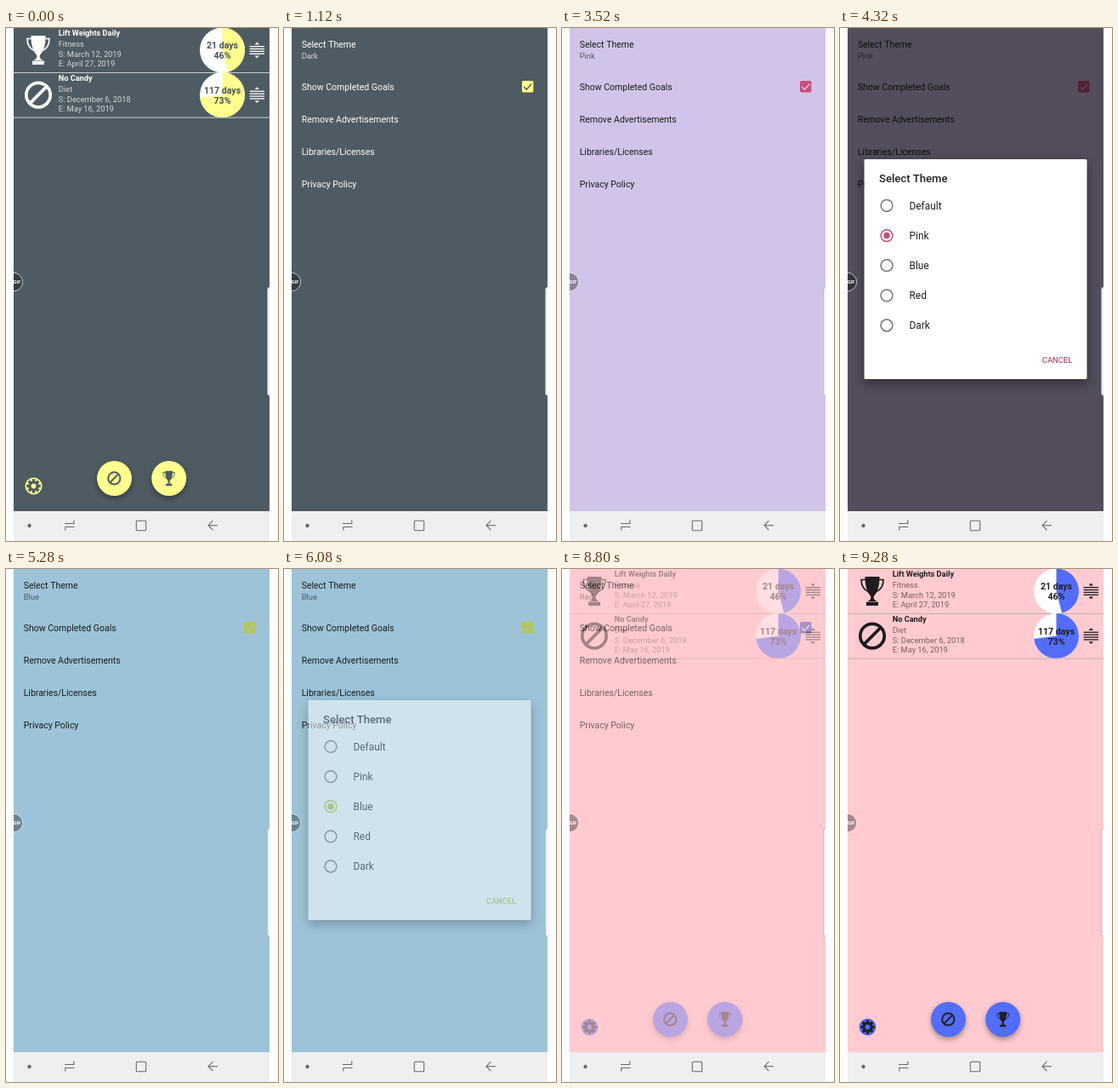
Recreate the animation shown at these times as an HTML page with a canvas. Size 320 by 602 pixels, loop 9.6 s.

```html
<!DOCTYPE html>
<html lang="en">
<head>
<meta charset="utf-8">
<title>Goal themes</title>
<style>
html, body { margin: 0; width: 100%; height: 100%; overflow: hidden; background: #fff; }
canvas { display: block; width: 320px; height: 602px; }
</style>
</head>
<body>
<canvas id="stage"></canvas>
<script>
const W = 320, H = 602, LOOP = 9600, STEP = 160;
const LEFT = 9, RIGHT = 310, NAV_Y = 567;
const dpr = window.devicePixelRatio || 1;

function setUp(canvas) {
  canvas.width = W * dpr;
  canvas.height = H * dpr;
  const c = canvas.getContext('2d');
  c.scale(dpr, dpr);
  return c;
}
const main = setUp(document.getElementById('stage'));
const group = setUp(document.createElement('canvas'));
let g = main;

const light = { ink: '#1c1c1c', sub: 'rgba(0,0,0,.54)', rule: '#bdb1b3', pieInk: '#212121' };
const themes = {
  Dark: { bg: '#4e5b62', accent: '#ffff8d', check: '#ffff8d', ink: '#ffffff',
          sub: 'rgba(255,255,255,.76)', rule: '#c9ced1', pieInk: '#46525a' },
  Pink: { ...light, bg: '#d2c4e8', accent: '#c04d78', check: '#cc4f7e' },
  Blue: { ...light, bg: '#9cc3d7', accent: '#b2ca48', check: '#b5c64f' },
  Red:  { ...light, bg: '#ffcbd0', accent: '#536dfe', check: '#6c6dc4' }
};
const options = ['Default', 'Pink', 'Blue', 'Red', 'Dark'];

// Each visit to the theme dialog: opening time, closing time, choice before and after
const visits = [
  { open: 1760, close: 3200, from: 'Dark', to: 'Pink' },
  { open: 4000, close: 4960, from: 'Pink', to: 'Blue' },
  { open: 5920, close: 6880, from: 'Blue', to: 'Red' }
];

// Steps taken so far in a change of n steps
const stepsIn = (t, start, n) =>
  t < start ? 0 : Math.min(n, Math.floor((t - start) / STEP) + 1);

function text(str, x, y, size, color, weight = 400, align = 'left') {
  g.font = `${weight} ${size}px Roboto, "Noto Sans", sans-serif`;
  g.textAlign = align;
  g.fillStyle = color;
  g.fillText(str, x, y);
}

function box(x, y, w, h, color) {
  g.fillStyle = color;
  g.fillRect(x, y, w, h);
}

function rounded(x, y, w, h, r, color) {
  g.beginPath();
  g.roundRect(x, y, w, h, r);
  g.fillStyle = color;
  g.fill();
}

function disc(x, y, r, color) {
  g.beginPath();
  g.arc(x, y, r, 0, Math.PI * 2);
  g.fillStyle = color;
  g.fill();
}

function ring(x, y, r, width, color) {
  g.beginPath();
  g.arc(x, y, r, 0, Math.PI * 2);
  g.lineWidth = width;
  g.strokeStyle = color;
  g.stroke();
}

function line(points, width, color) {
  g.beginPath();
  points.forEach(([x, y]) => g.lineTo(x, y));
  g.lineWidth = width;
  g.strokeStyle = color;
  g.stroke();
}

function shadow(dy, blur, alpha) {
  g.shadowColor = `rgba(0,0,0,${alpha})`;
  g.shadowBlur = blur * dpr;
  g.shadowOffsetY = dy * dpr;
}

// Draws something as one flat group with an opacity
function faded(alpha, draw) {
  if (alpha <= 0) return;
  if (alpha >= 1) return draw();
  group.clearRect(0, 0, W, H);
  g = group;
  draw();
  g = main;
  g.globalAlpha = alpha;
  g.drawImage(group.canvas, 0, 0, W, H);
  g.globalAlpha = 1;
}

function trophy(x, y, scale, color) {
  g.save();
  g.translate(x, y);
  g.scale(scale, scale);
  g.fillStyle = color;
  g.beginPath();
  g.moveTo(-8.5, -17);
  g.lineTo(8.5, -17);
  g.bezierCurveTo(8.8, -5, 5.5, 2, 1.8, 6);
  g.lineTo(1.8, 9);
  g.lineTo(5, 12);
  g.lineTo(-5, 12);
  g.lineTo(-1.8, 9);
  g.lineTo(-1.8, 6);
  g.bezierCurveTo(-5.5, 2, -8.8, -5, -8.5, -17);
  g.fill();
  g.fillRect(-7, 12.6, 14, 4.4);
  g.lineWidth = 1.7;
  g.strokeStyle = color;
  for (const side of [-1, 1]) {
    g.beginPath();
    g.moveTo(side * 8, -13.5);
    g.lineTo(side * 13, -13.5);
    g.bezierCurveTo(side * 13, -5, side * 9, -1, side * 4, 1);
    g.stroke();
  }
  g.restore();
}

function ban(x, y, r, width, color) {
  const d = r * Math.SQRT1_2;
  ring(x, y, r, width, color);
  line([[x - d, y + d], [x + d, y - d]], width, color);
}

function gear(x, y, color, hub) {
  g.save();
  g.translate(x, y);
  disc(0, 0, 6, color);
  for (let i = 0; i < 8; i++) {
    g.rotate(Math.PI / 4);
    box(-1.7, -8.2, 3.4, 4, color);
  }
  disc(0, 0, 2.9, hub);
  g.restore();
}

function pie(x, y, part, th) {
  disc(x, y, 26.5, '#fff');
  g.beginPath();
  g.moveTo(x, y);
  g.arc(x, y, 26.5, -Math.PI / 2, (part * 2 - 0.5) * Math.PI);
  g.fillStyle = th.accent;
  g.fill();
}

function grip(x, y, color) {
  for (let i = 0; i < 4; i++) box(x - 8.7, y - 5 + i * 2.9, 17.4, 1.3, color);
  g.fillStyle = color;
  for (const side of [-1, 1]) {
    g.beginPath();
    g.moveTo(x - 2.7, y + side * 6.6);
    g.lineTo(x + 2.7, y + side * 6.6);
    g.lineTo(x, y + side * 9.4);
    g.fill();
  }
}

function goal(top, lines, days, percent, th) {
  const [name, kind, start, end] = lines;
  text(name, 61.7, top + 9.4, 9.2, th.ink, 700);
  text(kind, 61.7, top + 21.9, 9.3, th.sub);
  text('S: ' + start, 61.7, top + 34, 9.3, th.sub);
  text('E: ' + end, 61.7, top + 45, 9.3, th.sub);
  pie(254.5, top + 26, percent / 100, th);
  text(days + ' days', 254.5, top + 24, 10.6, th.pieInk, 700, 'center');
  text(percent + '%', 254.5, top + 36, 10.6, th.pieInk, 700, 'center');
  grip(295.3, top + 26, th.ink);
  box(LEFT, top + 52, RIGHT - LEFT, 1, th.rule);
}

function home(th) {
  const mark = th === themes.Dark ? th.bg : '#212121';
  box(LEFT, 0, RIGHT - LEFT, NAV_Y, th.bg);
  goal(0, ['Lift Weights Daily', 'Fitness', 'March 12, 2019', 'April 27, 2019'], 21, 46, th);
  goal(52.6, ['No Candy', 'Diet', 'December 6, 2018', 'May 16, 2019'], 117, 73, th);
  trophy(38, 26, 1, th.ink);
  ban(38, 78.6, 14.2, 3.7, th.ink);
  for (const x of [127.5, 191.7]) {
    g.save();
    shadow(3, 6, 0.35);
    disc(x, 528.5, 20.5, th.accent);
    g.restore();
  }
  ban(127.3, 528.4, 7.1, 2, mark);
  trophy(191.7, 528.5, 0.52, mark);
  disc(32.5, 537.5, 10, th.accent);
  gear(32.5, 537.5, mark, th.accent);
}

function settings(th, name, pressed) {
  box(LEFT, 0, RIGHT - LEFT, NAV_Y, th.bg);
  if (pressed) box(LEFT, 0, RIGHT - LEFT, 50, 'rgba(0,0,0,.1)');
  text('Select Theme', 20.7, 23, 10.5, th.ink);
  text(name, 20.7, 35.8, 9.3, th.sub);
  ['Show Completed Goals', 'Remove Advertisements', 'Libraries/Licenses', 'Privacy Policy']
    .forEach((label, i) => text(label, 20.7, 73.2 + i * 38, 10.5, th.ink));
  rounded(280, 62, 13.4, 13.6, 1.6, th.check);
  line([[282.2, 69], [285.3, 72.2], [291.2, 65.8]], 1.5, th.bg);
}

function dialog(th, choice, pressed) {
  g.save();
  shadow(5, 14, 0.45);
  rounded(28.5, 154, 262, 258, 1.5, '#fff');
  g.restore();
  text('Select Theme', 46, 181, 13.1, '#212121', 500);
  options.forEach((label, i) => {
    const y = 208.4 + i * 35.15, on = label === choice;
    if (on && pressed) box(28.5, y - 17.5, 262, 35, 'rgba(0,0,0,.1)');
    ring(55, y, 6.9, 1.5, on ? th.accent : '#757575');
    if (on) disc(55, y, 3.7, th.accent);
    text(label, 81.5, y + 4.4, 11.9, '#212121');
  });
  text('CANCEL', 273.2, 393.2, 9.35, th.accent, 500, 'right');
}

function system() {
  const ink = '#6a6a6a';
  box(LEFT, NAV_Y, RIGHT - LEFT, H - NAV_Y, '#efefef');
  disc(27.5, 584, 2.2, ink);
  line([[69, 581.5], [79.8, 581.5], [79.8, 577.5]], 1.1, ink);
  line([[80.5, 585.5], [69.8, 585.5], [69.8, 589.5]], 1.1, ink);
  g.beginPath();
  g.roundRect(153.3, 578.3, 11.4, 11.4, 1);
  g.lineWidth = 1.1;
  g.strokeStyle = ink;
  g.stroke();
  line([[249, 583.7], [238, 583.7]], 1.1, ink);
  line([[243.4, 578.2], [238, 583.7], [243.4, 589.2]], 1.1, ink);

  g.save();
  g.beginPath();
  g.rect(LEFT, 0, RIGHT - LEFT, H);
  g.clip();
  // Side panel handle
  rounded(307.2, 304, 8, 127.5, 3, '#b9bcbf');
  rounded(308, 304.8, 8, 126, 2.5, '#eef0f1');
  // Recorder bubble
  disc(8.8, 298, 10.8, 'rgba(0,0,0,.33)');
  ring(8.8, 298, 10.8, 0.9, 'rgba(255,255,255,.75)');
  text('GIF', 13, 300, 5.6, '#fff', 700, 'center');
  g.restore();
}

function settingsAt(t) {
  let name = 'Dark', choice = null, alpha = 0, dim = 0, rowPressed = false, optionPressed = false;
  for (const v of visits) {
    const opening = stepsIn(t, v.open, 3), closing = stepsIn(t, v.close, 3);
    if (!opening) break;
    name = closing > 1 ? v.to : v.from;
    choice = closing ? v.to : v.from;
    rowPressed = opening === 1;
    optionPressed = closing === 1;
    alpha = closing ? [0, 1, 0.5, 0][closing] : [0, 0, 0.535, 1][opening];
    dim = closing ? [0, 0.6, 0.3, 0][closing] : [0, 0, 0, 0.6][opening];
  }
  const th = themes[name];
  settings(th, name, rowPressed);
  if (dim) box(LEFT, 0, RIGHT - LEFT, NAV_Y, `rgba(0,0,0,${dim})`);
  faded(alpha, () => dialog(th, choice, optionPressed));
}

function draw(t) {
  g = main;
  box(0, 0, W, H, '#fff');
  const entered = stepsIn(t, 640, 4) / 4;
  const left = stepsIn(t, 8640, 5) / 5;
  if (entered < 1) {
    home(themes.Dark);
    faded(entered, () => settings(themes.Dark, 'Dark'));
  } else {
    if (left < 1) settingsAt(t);
    faded(left, () => home(themes.Red));
  }
  system();
}

const began = performance.now();
function tick() {
  draw((performance.now() - began) % LOOP);
  requestAnimationFrame(tick);
}
tick();
</script>
</body>
</html>
```
